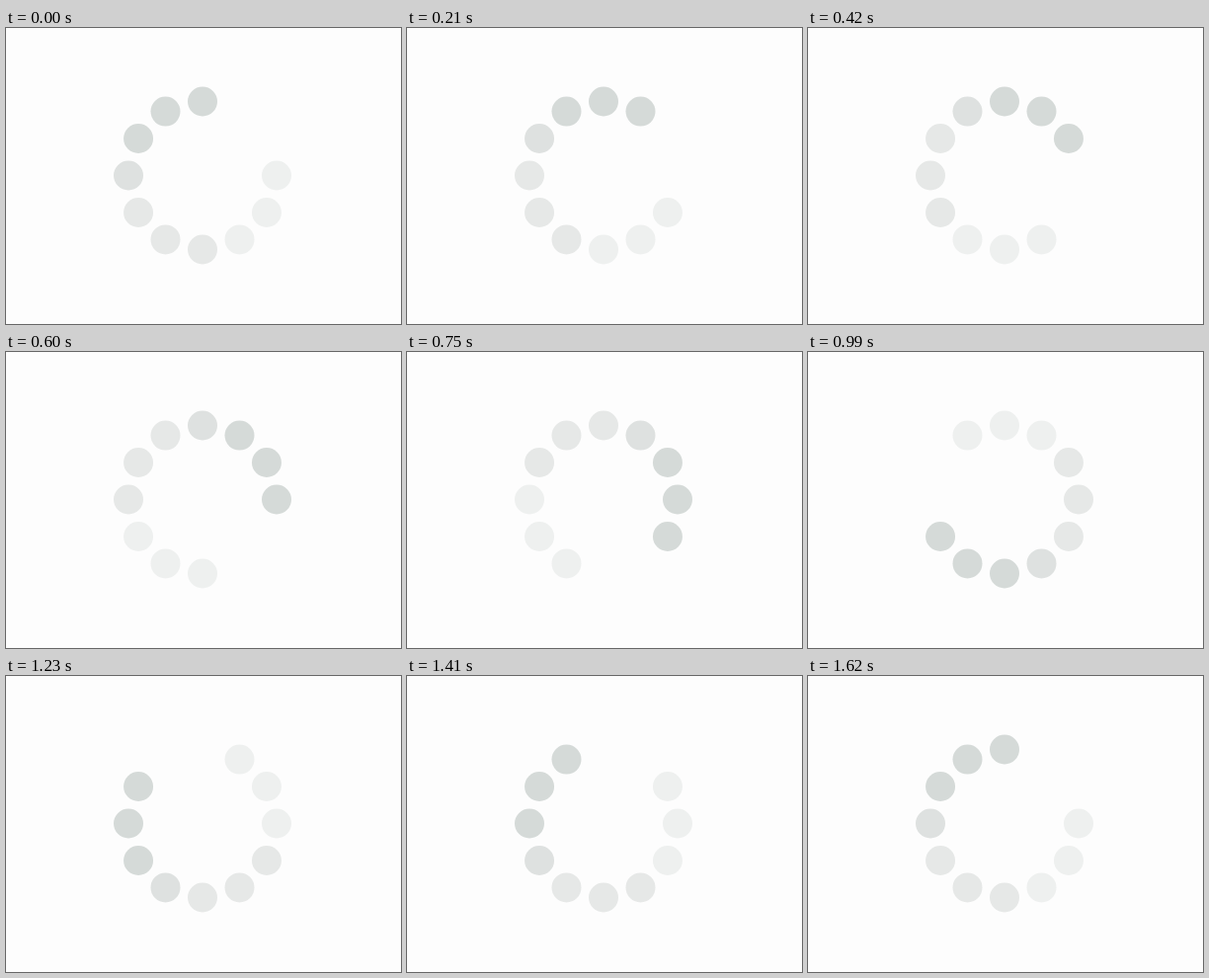
Recreate the animation shown at these times as an HTML page with a canvas. Size 400x300 px, loop 1830 ms.

```html
<!DOCTYPE html>
<html lang="en">
<head>
<meta charset="utf-8">
<title>Loading spinner</title>
<style>
  html, body { margin: 0; width: 100%; height: 100%; overflow: hidden; background: #fdfdfd; }
  canvas { display: block; width: 400px; height: 300px; }
</style>
</head>
<body>
<canvas id="stage" width="400" height="300"></canvas>
<script>
const ctx = document.getElementById('stage').getContext('2d');
const DOTS = 12, CX = 199, CY = 149.5, RING = 75, DOT = 15;
const LOOP = 1830;

// Moments at which the head moves one place clockwise
const STEPS = [210, 420, 600, 750, 840, 900, 930, 990, 1080, 1230, 1410, 1620];

const DARK = '#d5dad8', MID = '#dee1e0', LIGHT = '#e6e8e7', PALE = '#eef0ef';
const TAIL = [DARK, DARK, DARK, MID, LIGHT, LIGHT, LIGHT, PALE, PALE, PALE];

function drawDot(place, color) {
  const a = place / DOTS * 2 * Math.PI;
  ctx.fillStyle = color;
  ctx.beginPath();
  ctx.arc(CX + RING * Math.sin(a), CY - RING * Math.cos(a), DOT, 0, 2 * Math.PI);
  ctx.fill();
}

function draw(ms) {
  const t = ms % LOOP;
  const head = STEPS.filter(s => t >= s).length;
  ctx.fillStyle = '#fdfdfd';
  ctx.fillRect(0, 0, 400, 300);
  TAIL.forEach((color, i) => drawDot(head - i, color));
}

const start = performance.now();
function tick() {
  draw(performance.now() - start);
  requestAnimationFrame(tick);
}
tick();
</script>
</body>
</html>
```
